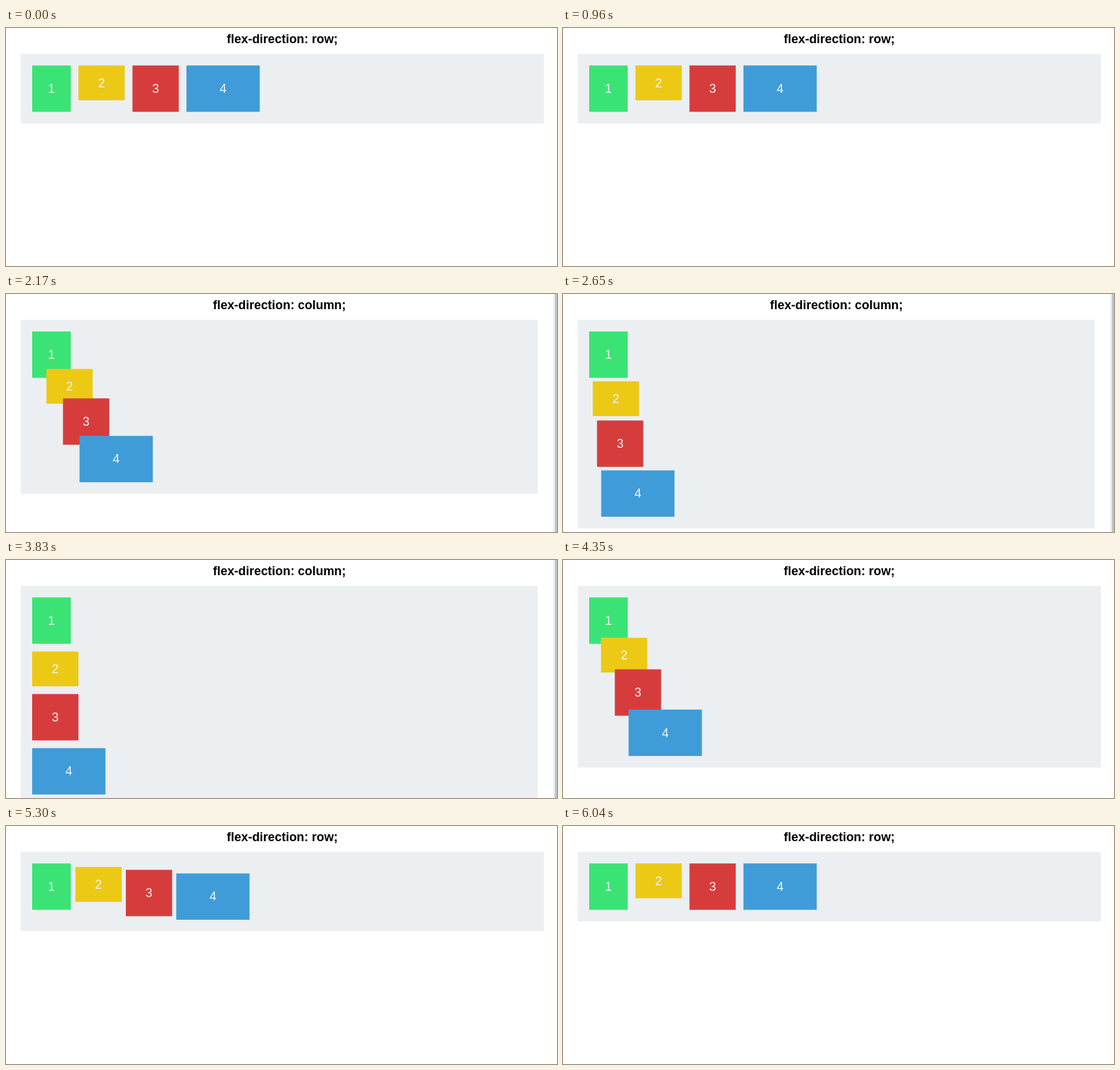
Write an HTML page that moves like this. It is 800 by 345 pixels and loops after 6170 ms.

```html
<!DOCTYPE html>
<html lang="en">
<head>
<meta charset="utf-8">
<title>flex-direction</title>
<style>
  html, body { margin: 0; width: 100%; height: 100%; overflow: hidden; background: #e6eaec; }
  svg { display: block; width: 800px; height: 345px; }
  text { font: 17.92px "Liberation Sans", Arial, sans-serif; text-anchor: middle; fill: #f4f7f7; }
  #title { font-weight: bold; fill: #000; }
</style>
</head>
<body>
<svg viewBox="0 0 800 345">
  <rect width="800" height="345" rx="2.5" fill="#fff"/>
  <text id="title" y="21.6"></text>
  <rect id="panel" x="21.3" y="37.5" fill="#ebeff2"/>
  <g id="boxes"></g>
  <g id="scrollbar">
    <rect x="794.5" width="2.5" height="345" fill="#e9eef0"/>
    <rect x="797" width="3" height="345" fill="#b9c6ca"/>
  </g>
</svg>
<script>
const LOOP = 6170, STEP = 43.453, LAST = 139;
const TO_COLUMN = 1400, TO_ROW = 4005, DURATION = 1890;
const LEFT = 38, TOP = 54.3, GAP = 11.2, PAD = 16.8;
const NS = "http://www.w3.org/2000/svg";
const $ = id => document.getElementById(id);

const boxes = [
  { w: 56, h: 67.2, color: "#3be375" },
  { w: 67.2, h: 50.4, color: "#ecc915" },
  { w: 67.2, h: 67.2, color: "#d73c3c" },
  { w: 106.4, h: 67.2, color: "#3f9cd8" }
];

function add(parent, tag, attrs) {
  const el = document.createElementNS(NS, tag);
  for (const key in attrs) el.setAttribute(key, attrs[key]);
  return parent.appendChild(el);
}

// Offset of each box along the row and along the column
let dx = 0, dy = 0;
boxes.forEach((box, i) => {
  box.dx = dx;
  box.dy = dy;
  dx += box.w + GAP;
  dy += box.h + GAP;
  box.el = add($("boxes"), "g", {});
  add(box.el, "rect", { width: box.w, height: box.h, fill: box.color });
  add(box.el, "text", { x: box.w / 2, y: box.h / 2 + 6.1 }).textContent = i + 1;
});
const lastDrop = boxes[3].dy;

// cubic-bezier(.25, .1, .25, 1)
function ease(x) {
  if (x <= 0) return 0;
  if (x >= 1) return 1;
  let lo = 0, hi = 1;
  for (let i = 0; i < 24; i++) {
    const u = (lo + hi) / 2;
    if (0.75 * u * (1 - u) + u ** 3 < x) lo = u; else hi = u;
  }
  return 0.3 * lo * (1 - lo) ** 2 + 3 * lo * lo * (1 - lo) + lo ** 3;
}

// Start of the n-th screen refresh, on a 10 ms grid
const tick = n => Math.round(n * STEP / 10) * 10;

function snap(time) {
  let n = Math.min(LAST, Math.floor(time / STEP) + 1);
  while (tick(n) > time) n--;
  return tick(n);
}

function draw(now) {
  const t = snap(now % LOOP);
  const column = t >= TO_COLUMN && t < TO_ROW;
  const p = ease((t - TO_COLUMN) / DURATION) - ease((t - TO_ROW) / DURATION);

  $("title").textContent = `flex-direction: ${column ? "column" : "row"};`;
  $("title").setAttribute("x", column ? 397 : 401.2);
  $("scrollbar").style.display = column ? "" : "none";
  $("panel").setAttribute("width", column ? 750.7 : 759.7);
  $("panel").setAttribute("height", 67.2 + 2 * PAD + lastDrop * p);
  for (const box of boxes) {
    const x = LEFT + box.dx * (1 - p), y = TOP + box.dy * p;
    box.el.setAttribute("transform", `translate(${x} ${y})`);
  }
}

function frame() {
  draw(performance.now());
  requestAnimationFrame(frame);
}
frame();
</script>
</body>
</html>
```
